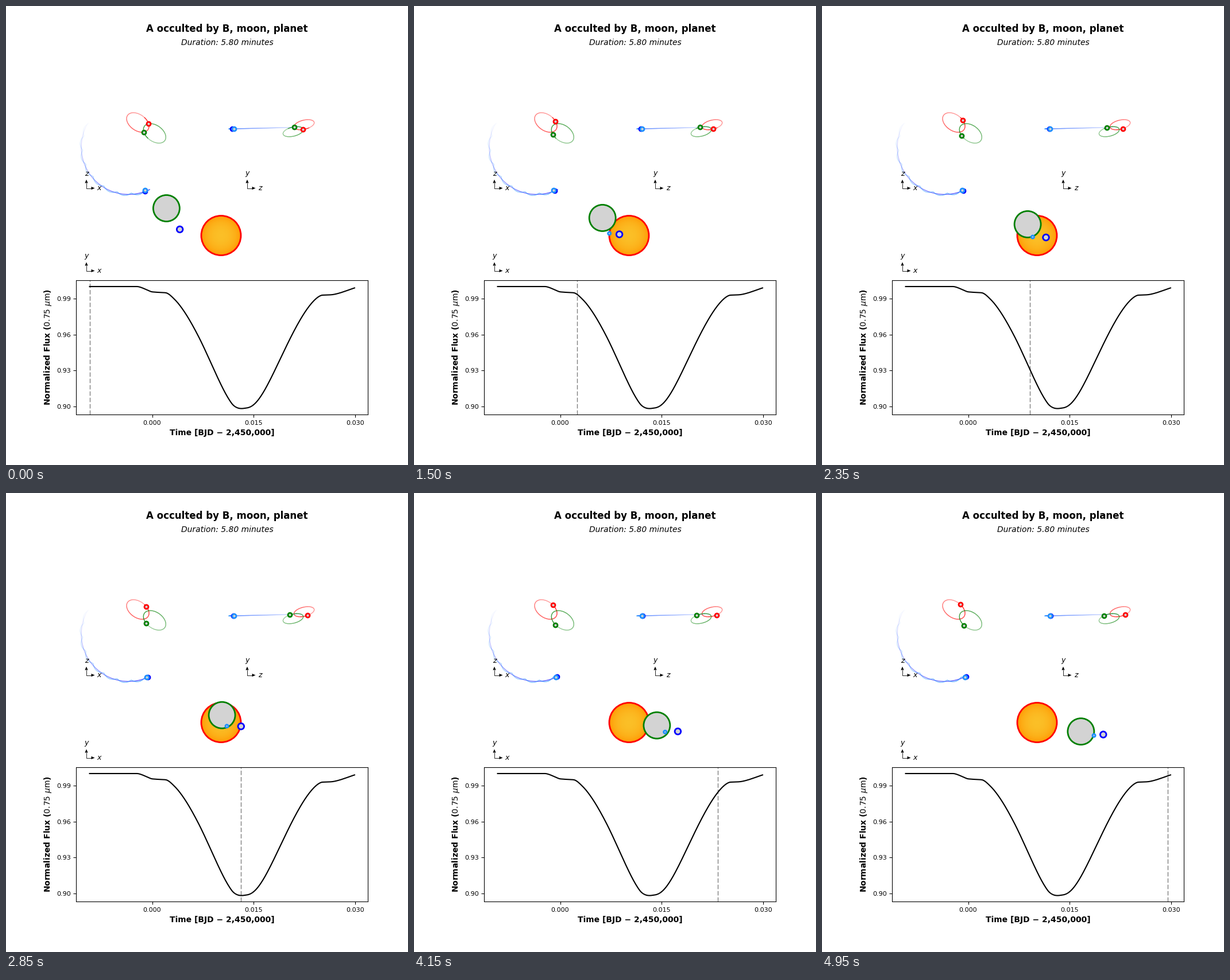
Animation, 700 px wide and 800 px high, one loop 5 s. Source, as a matplotlib script:

```python
import numpy as np
import matplotlib.pyplot as plt
from matplotlib.animation import FuncAnimation
from matplotlib.collections import LineCollection
from matplotlib.colors import to_rgb
from matplotlib.patches import Circle, Polygon

FRAMES, INTERVAL = 100, 50
T0, SPAN, DEPTH = -0.00926, 0.0392, 0.1016
A_POS, R_A, R_B, R_PLANET, R_MOON = (374.5, 400.0), 34.5, 23.0, 5.3, 2.6
LIMB, B_SHARE = 0.4, 0.6

plt.rcParams["font.family"] = "DejaVu Sans"
plt.rcParams["text.kerning_factor"] = 6


# Paths on the sky, in pixels

KEYS = [0, 16, 30, 47, 67, 83, 99]


def smooth_path(xs, ys):
    px, py = np.polyfit(KEYS, xs, 3), np.polyfit(KEYS, ys, 3)
    return lambda i: np.array([np.polyval(px, i), np.polyval(py, i)])


sky_b = smooth_path([279.5, 304.3, 328.2, 358.3, 394.3, 422.5, 451],
                    [352.6, 360.8, 369.5, 380.5, 394, 405, 415.7])
sky_planet = smooth_path([302.7, 331.3, 357.7, 390, 428.7, 459.3, 489.8],
                         [389.4, 393.6, 398, 403.5, 410, 415.5, 421])


def moon_phase(i):
    return np.radians(1.385 * i + 2.5)


def sky_moon(i):
    a = moon_phase(i)
    return sky_planet(i) + np.array([-25 * np.sin(a), -2.2 * np.cos(a)])


# Orbits seen from above (x, z) and from the side (z, y)

def side_x(top_y):
    return 517 + (205 - top_y) * 1.037


def star_angle(i):
    return np.radians(-15.5 - 0.55 * i + 0.0016 * i ** 2)


def orbit_a(a):
    x = 229.5 + 19.5 * np.cos(a)
    y = 203 + 17 * np.cos(a - np.radians(67))
    return x, y, side_x(y), 206.9 + 8.8 * np.cos(a)


def orbit_b(a):
    x, y, zx, zy = orbit_a(a)
    return 488.3 - x, 425 - y, 1019.1 - zx, 425.9 - zy


def side_point(x, y):
    zx = side_x(y)
    return x, y, zx, 214.1 - (zx - 396) * 0.024


def orbit_planet(i):
    a = np.radians(69.7 - 0.0655 * i)
    return side_point(213.5 + 82.4 * np.cos(a), 246 + 82.4 * np.sin(a))


def orbit_moon(i):
    x, y = orbit_planet(i)[:2]
    a = moon_phase(i)
    return side_point(x - 2.2 * np.sin(a), y - 2.1 * np.cos(a))


# Light curve: limb-darkened discs hidden by the bodies in front

def hidden(center, radius, occultors, n=220):
    g = (np.arange(n) + 0.5) / n * 2 - 1
    x, y = np.meshgrid(g, g)
    inside = x ** 2 + y ** 2 < 1
    x, y = x[inside], y[inside]
    weight = 1 - LIMB * (1 - np.sqrt(1 - x ** 2 - y ** 2))
    clear = np.ones_like(x)
    for (ox, oy), r in occultors:
        dist = np.hypot(center[0] + radius * x - ox, center[1] + radius * y - oy)
        clear *= 1 - np.clip((r - dist) * n / (2 * radius) + 0.5, 0, 1)
    return 1 - (weight * clear).sum() / weight.sum()


def light_curve(steps):
    loss_a, loss_b = [], []
    for i in steps:
        small = [(sky_planet(i), R_PLANET), (sky_moon(i), R_MOON)]
        loss_a.append(hidden(A_POS, R_A, small + [(sky_b(i), R_B)]))
        loss_b.append(hidden(sky_b(i), R_B, small))
    loss_a, loss_b = np.array(loss_a), B_SHARE * np.array(loss_b)
    k = loss_a.argmax()
    return 1 - loss_a * (DEPTH - loss_b[k]) / loss_a[k] - loss_b


def time_at(i):
    return T0 + SPAN * i / FRAMES


fig = plt.figure(figsize=(7, 8), dpi=100, facecolor="white")
fig.subplots_adjust(left=0.175, right=0.9, bottom=0.11, top=0.88, hspace=0.2)

# Flux panel
lc = plt.subplot2grid((5, 1), (3, 0), rowspan=2)
steps = np.linspace(0, FRAMES, 241)
lc.plot(time_at(steps), light_curve(steps), "k-", lw=1.5)
lc.set_xlim(time_at(-5), time_at(105))
lc.set_ylim(1 - 1.05 * DEPTH, 1 + 0.05 * DEPTH)
lc.set_xticks([0, 0.015, 0.03])
lc.set_yticks([0.90, 0.93, 0.96, 0.99])
lc.xaxis.set_major_formatter("{x:.3f}")
lc.yaxis.set_major_formatter("{x:.2f}")
lc.tick_params(labelsize=8)
lc.set_xlabel("Time [BJD \u2212 2,450,000]", fontweight="bold", fontsize=10)
lc.set_ylabel(r"Normalized Flux ($0.75\ \mu\mathrm{m}$)",
              fontweight="bold", fontsize=10)
tracker = lc.axvline(T0, color="k", alpha=0.5, lw=1, dashes=(5.55, 2.4))

# Pixel stage for everything else
stage = fig.add_axes([0, 0, 1, 1])
stage.set(xlim=(0, 700), ylim=(800, 0))
stage.axis("off")
stage.patch.set_visible(False)

stage.text(385, 40, "A occulted by B, moon, planet", ha="center", va="center",
           fontsize=12, fontweight="bold")
stage.text(385, 64, "Duration: 5.80 minutes", ha="center", va="center",
           fontsize=10, fontstyle="italic")


def compass(x, y, right, up):
    stage.plot([x, x, x + 9], [y - 9, y, y], color="k", lw=0.6)
    stage.add_patch(Polygon([(x - 2.6, y - 9), (x + 2.6, y - 9), (x, y - 15)],
                            fc="k", lw=0))
    stage.add_patch(Polygon([(x + 8.5, y - 2.6), (x + 8.5, y + 2.6), (x + 14.5, y)],
                            fc="k", lw=0))
    style = dict(ha="center", va="center", fontsize=9, fontstyle="italic")
    stage.text(x, y - 25.5, up, **style)
    stage.text(x + 22, y, right, **style)


compass(140, 317.5, "x", "z")
compass(420, 317.5, "z", "y")
compass(140, 461.5, "x", "y")


def trail(path, params, color, alpha0, alpha1):
    x, y, zx, zy = path(params)
    alphas = np.linspace(alpha0, alpha1, len(params) - 1)
    colors = [(*to_rgb(color), a) for a in alphas]
    for px, py in ((x, y), (zx, zy)):
        pts = np.column_stack([px, py])
        segs = np.stack([pts[:-1], pts[1:]], axis=1)
        stage.add_collection(LineCollection(segs, colors=colors, linewidths=1))


last = star_angle(99)
loop = np.linspace(last + 2 * np.pi, last, 121)
past = np.linspace(-2180, 99, 281)
trail(orbit_a, loop, "red", 0.38, 1)
trail(orbit_b, loop, "green", 0.38, 1)
trail(orbit_planet, past, "blue", 0, 0.8)
trail(orbit_moon, past, "dodgerblue", 0, 0.75)


def ring_markers(color):
    return stage.plot([], [], "o", ms=5, mfc="lightgrey", mec=color, mew=2,
                      zorder=4)[0]


markers = [(ring_markers("red"), lambda i: orbit_a(star_angle(i))),
           (ring_markers("green"), lambda i: orbit_b(star_angle(i))),
           (ring_markers("blue"), orbit_planet),
           (ring_markers("dodgerblue"), orbit_moon)]

# Star A with a limb-darkened fill
rim, core = np.array([255, 150, 0]) / 255, np.array([251, 191, 39]) / 255
for f in np.linspace(1, 0.03, 34):
    mu = np.sqrt(1 - f ** 2)
    stage.add_patch(Circle(A_POS, R_A * f, fc=rim + (core - rim) * mu ** 1.3,
                           lw=0, zorder=5))
stage.add_patch(Circle(A_POS, R_A, fill=False, ec="red", lw=2, zorder=5))


def disc(radius, color):
    return stage.add_patch(Circle((0, 0), radius, fc="lightgrey", ec=color, lw=2,
                                  zorder=6))


discs = [(disc(R_B, "green"), sky_b),
         (disc(R_MOON, "dodgerblue"), sky_moon),
         (disc(R_PLANET, "blue"), sky_planet)]


def update(i):
    tracker.set_xdata([time_at(i)] * 2)
    for mark, path in markers:
        x, y, zx, zy = path(i)
        mark.set_data([x, zx], [y, zy])
    for patch, path in discs:
        patch.center = tuple(path(i))
    return [tracker]


anim = FuncAnimation(fig, update, frames=FRAMES, interval=INTERVAL,
                     repeat=True, repeat_delay=0)
plt.show()
```
